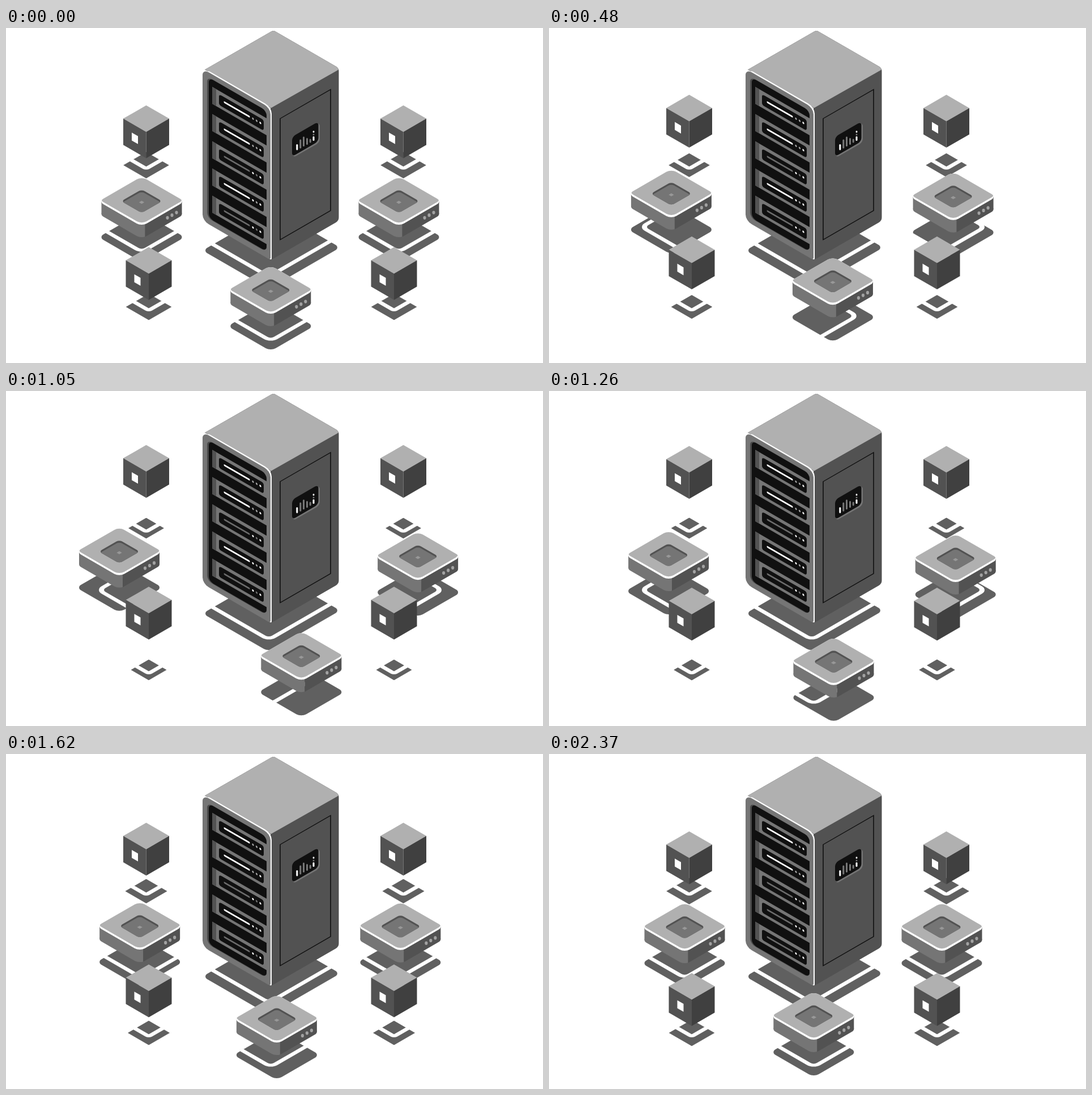
An HTML page with a canvas for the animation above (2700 ms loop, 948x591 px).

```html
<!DOCTYPE html>
<html lang="en">
<head>
<meta charset="utf-8">
<title>Server network</title>
<style>
  html, body { margin: 0; width: 100%; height: 100%; overflow: hidden; background: #fff; }
  canvas { display: block; width: 948px; height: 591px; }
</style>
</head>
<body>
<canvas id="stage" width="948" height="591"></canvas>
<script>
const ctx = document.getElementById('stage').getContext('2d');
const LOOP = 2700, STEP = 30, SLOPE = 0.577;
const LIGHT = '#b0b0b0', MID = '#757575', DARK = '#525252', DEEP = '#404040',
      SHADOW = '#606060', INK = '#101010', WHITE = '#fff';

const clamp = v => Math.min(1, Math.max(0, v));
const mix = (a, b, k) => a + (b - a) * k;
const easeInOut = p => p < 0.5 ? 2 * p * p : 1 - 2 * (1 - p) * (1 - p);

// Cubic bezier easing with control points (x1, 0) and (x2, 1)
function bezierEase(p, x1, x2) {
  let lo = 0, hi = 1;
  for (let i = 0; i < 24; i++) {
    const s = (lo + hi) / 2, r = 1 - s;
    if (3 * s * r * r * x1 + 3 * s * s * r * x2 + s * s * s < p) lo = s; else hi = s;
  }
  return lo * lo * (3 - 2 * lo);
}

function withMatrix(m, draw) {
  ctx.save();
  ctx.transform(...m);
  draw();
  ctx.restore();
}
const onFloor = (x, y, draw) => withMatrix([0.866, 0.5, -0.866, 0.5, x, y], draw);
const onLeft = (x, y, draw) => withMatrix([1, SLOPE, 0, 1, x, y], draw);
const onRight = (x, y, draw) => withMatrix([1, -SLOPE, 0, 1, x, y], draw);

function box(x, y, w, h, r, color) {
  ctx.beginPath();
  ctx.roundRect(x, y, w, h, r);
  ctx.fillStyle = color;
  ctx.fill();
}

function outline(x, y, w, h, r, color, width) {
  ctx.beginPath();
  ctx.roundRect(x, y, w, h, r);
  ctx.strokeStyle = color;
  ctx.lineWidth = width;
  ctx.stroke();
}

function bar(x1, y1, x2, y2, color, width = 3) {
  ctx.beginPath();
  ctx.moveTo(x1, y1);
  ctx.lineTo(x2, y2);
  ctx.lineCap = 'round';
  ctx.strokeStyle = color;
  ctx.lineWidth = width;
  ctx.stroke();
}

function dot(x, y, rx, ry, color) {
  ctx.beginPath();
  ctx.ellipse(x, y, rx, ry, 0, 0, 7);
  ctx.fillStyle = color;
  ctx.fill();
}

// Polygon of [x, y, cornerRadius] points
function poly(points, color) {
  const n = points.length, [a, b] = [points[n - 1], points[0]];
  ctx.beginPath();
  ctx.moveTo((a[0] + b[0]) / 2, (a[1] + b[1]) / 2);
  points.forEach(([x, y, r = 0], i) => {
    const next = points[(i + 1) % n];
    ctx.arcTo(x, y, next[0], next[1], r);
  });
  ctx.closePath();
  ctx.fillStyle = color;
  ctx.fill();
}

// Square lying on the floor, centred on (x, y)
const tile = (x, y, side, r, color) =>
  onFloor(x, y, () => box(-side / 2, -side / 2, side, side, r, color));
const track = (x, y, side, r) =>
  onFloor(x, y, () => outline(-side / 2, -side / 2, side, side, r, WHITE, 7.3));

const CUBES = [[247.5, 137], [701.5, 137], [252, 387], [685, 387]];
const CUBE_SIDE = 46.6;

function cubeShadow([x, y], rise) {
  tile(x, y + 105, CUBE_SIDE * (1 - 0.22 * rise), 0.5, SHADOW);
  track(x, y + 87.8, CUBE_SIDE, 3);
}

function cube([x, y], rise) {
  const w = 40.5, top = y - 0.5 - 41.3 * rise, h = 46.5, d = w * SLOPE;
  poly([[x, top], [x + w, top + d], [x, top + 2 * d], [x - w, top + d]], LIGHT);
  poly([[x - w, top + d], [x, top + 2 * d], [x, top + 2 * d + h], [x - w, top + d + h]], DARK);
  poly([[x, top + 2 * d], [x + w, top + d], [x + w, top + d + h], [x, top + 2 * d + h]], DEEP);
  onLeft(x - 25.5, top + 48, () => box(0, 0, 11, 14, 0, WHITE));
}

const ROUTER_SIDE = 87.8, ROUTER_R = 10;

function routerShadow({ x, y, dx, dy }) {
  tile(x + dx, y + dy + 63, ROUTER_SIDE, ROUTER_R, SHADOW);
  track(x, y + 45, ROUTER_SIDE, ROUTER_R);
}

function router({ x, y, dx, dy }) {
  const cx = x + dx, cy = y + dy, half = ROUTER_SIDE / 2;
  const slab = (lift, color) => tile(cx, cy + lift, ROUTER_SIDE, ROUTER_R, color);
  [[cx - 80, 86, MID], [cx + 6, 80, DARK]].forEach(([left, width, color]) => {
    ctx.save();
    ctx.beginPath();
    ctx.rect(left, cy - 60, width, 160);
    ctx.clip();
    box(cx - 71, cy, 142, 22, 0, color);
    slab(22, color);
    ctx.restore();
  });

  // Top plate with a white rim along its front edges
  slab(0, WHITE);
  ctx.save();
  onFloor(cx, cy, () => {
    ctx.beginPath();
    ctx.roundRect(-half, -half, ROUTER_SIDE, ROUTER_SIDE, ROUTER_R);
  });
  ctx.clip();
  slab(-3.8, LIGHT);
  ctx.restore();

  onFloor(cx, cy - 0.5, () => {
    ctx.beginPath();
    ctx.roundRect(-20.8, -20.8, 41.6, 41.6, 6);
    ctx.fillStyle = DARK;
    ctx.fill();
    ctx.clip();
    box(-17.3, -17.3, 41.6, 41.6, 6, MID);
  });
  tile(cx, cy + 1.5, 5.4, 0, '#989898');
  for (let i = 0; i < 3; i++) dot(cx + 45.5 + 8 * i, cy + 28.8 - 4.6 * i, 2.6, 3.1, '#a2a2a2');
}

function towerShadow() {
  onFloor(473, 319.8, () => box(0, 0, 135, 145.5, 10, SHADOW));
  onFloor(473, 298.3, () => outline(0, 0, 135, 145.5, 10, WHITE, 7.3));
}

function rackUnit(i, lit) {
  const y = 48 * i;
  box(17, y + 22, 96, 30, 0, MID);
  box(17, y + 22, 7, 30, 0, DARK);
  box(29, y + 28, 79, 19, 4, INK);
  bar(39, y + 36.7, 82, y + 36.7, '#6c6c6c');
  if (lit < 1) bar(mix(39, 82, lit), y + 36.7, 82, y + 36.7, WHITE);
  const shades = i < 2 ? ['#a8a8a8', '#a8a8a8', WHITE] : [WHITE, i === 3 ? '#a8a8a8' : MID, WHITE];
  shades.forEach((c, k) => dot(89 + 6.5 * k, y + 36.6, 1.6, 1.8, c));
}

function tower(wipe) {
  ctx.save();
  poly([[472, 4, 7], [587.5, 70.7, 10], [587.5, 340, 10], [467, 409.7, 2], [467, 141], [351, 73.6]], DARK);
  ctx.clip();
  poly([[472, 4, 7], [590, 72, 3], [468, 141], [351, 73.6]], LIGHT);
  ctx.restore();

  onLeft(347, 72, () => {
    box(6, -2.5, 116, 269.5, [8, 11, 3, 8], WHITE);
    box(0, 0, 120, 268, [11, 11, 4, 11], MID);
    box(8, 9, 105, 249, 9, '#4a4a4a');
    box(11, 9, 102, 248, 8, INK);
    [0, 0, 1, wipe, 1].forEach((lit, i) => rackUnit(i, lit));
  });

  onRight(468.5, 142, () => {
    outline(15.5, 26.7, 89, 213.8, 0, INK, 1.6);
    box(38, 74, 47.5, 35, 6, MID);
    box(36.5, 71, 46.5, 35, 6, INK);
  });
  const gray = '#777';
  bar(513.8, 206.5, 513.8, 214, WHITE);
  bar(519.8, 198, 519.8, 211, gray);
  bar(525.5, 193, 525.5, 207.5, gray);
  bar(531.5, 195.5, 531.5, 204.5, gray);
  bar(537.2, 197, 537.2, 201, gray);
  bar(543, 192.5, 543, 197.5, WHITE);
  dot(543, 183, 1.5, 1.7, WHITE);
  dot(543, 188, 1.5, 1.6, gray);
}

// Corner points of the front router's round trip, one eased leg each
const ROUTE = [[0, 0], [33.4, -15.8], [60, 2.2], [33, 16], [0, 0]];

function alongRoute(t) {
  const pos = clamp(t / 1800) * 4, leg = Math.min(3, Math.floor(pos));
  const k = easeInOut(pos - leg), [a, b] = [ROUTE[leg], ROUTE[leg + 1]];
  return { dx: mix(a[0], b[0], k), dy: mix(a[1], b[1], k) };
}

function render(t) {
  const swing = easeInOut(clamp(1 - Math.abs(t - 900) / 900));
  const rise = bezierEase(clamp(1 - Math.abs(t - 1040) / 750), 0.31, 0.08);
  const wipe = clamp((t - 1830) / 540) ** 2;
  const routers = [
    { x: 239.5, y: 306, dx: -41.8 * swing, dy: -23.5 * swing },
    { x: 693.5, y: 306, dx: 35.6 * swing, dy: -14.6 * swing },
    { x: 467.3, y: 463, ...alongRoute(t) }
  ];

  ctx.fillStyle = WHITE;
  ctx.fillRect(0, 0, 948, 591);
  CUBES.forEach(c => cubeShadow(c, rise));
  towerShadow();
  routers.forEach(routerShadow);
  tower(wipe);
  routers.forEach(router);
  CUBES.forEach(c => cube(c, rise));
}

let start;
function frame(now) {
  start ??= now;
  render(Math.floor(((now - start) % LOOP) / STEP) * STEP);
  requestAnimationFrame(frame);
}
render(0);
requestAnimationFrame(frame);
</script>
</body>
</html>
```
